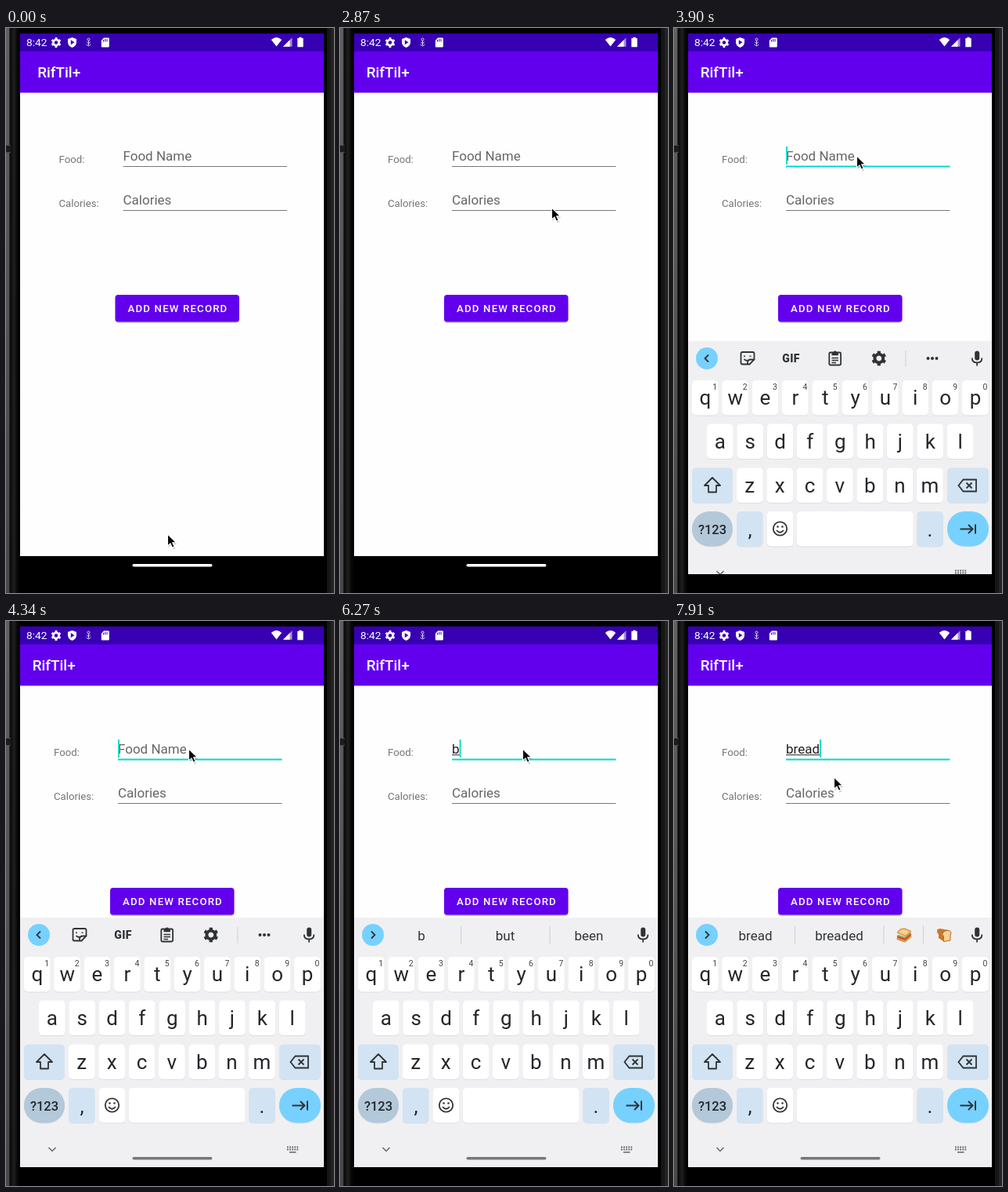
Recreate the animation shown at these times as an HTML page. Size 419 by 720 pixels, loop 8000 ms.

```html
<!DOCTYPE html>
<html lang="en">
<head>
<meta charset="utf-8">
<title>Food record form</title>
<style>
  html, body { margin: 0; width: 100%; height: 100%; overflow: hidden; background: #000; }
  svg { display: block; width: 100vw; height: 100vh; font-family: Roboto, sans-serif; }
  .mid { text-anchor: middle; }
  .label { font-size: 13.2px; fill: #757575; }
  .field { font-size: 17px; fill: #666; }
  .typed { fill: #212121; }
  .line { fill: none; stroke: #303336; stroke-width: 1.8; }
  .letter { font-size: 26px; fill: #24272a; }
  .digit { font-size: 10.5px; fill: #444; }
  .word { font-size: 17px; fill: #303336; }
  .rule { stroke: #cdced2; }
</style>
</head>
<body>
<svg viewBox="0 0 419 720" preserveAspectRatio="none">
  <defs>
    <linearGradient id="bezel">
      <stop offset="0" stop-color="#080808"/><stop offset=".4" stop-color="#202020"/>
      <stop offset=".7" stop-color="#090909"/><stop offset="1" stop-color="#000"/>
    </linearGradient>
    <linearGradient id="edge" x2="0" y2="1">
      <stop offset="0" stop-color="#606060"/><stop offset="1" stop-color="#484848"/>
    </linearGradient>
    <clipPath id="screen"><path d="M18 82H406V696H18z"/></clipPath>
  </defs>

  <path d="M0 0H419V720H0z"/>
  <path d="M5 0H18V720H5z" fill="url(#bezel)"/>
  <path d="M0 0H4.5V720H0z" fill="url(#edge)"/>
  <path d="M0 149H6V159H0z" fill="#1c1c1c"/>
  <path d="M0 149.5H6M0 158.5H6" stroke="#4a4a4a"/>
  <path d="M410 0H415V720H410z" fill="#161616"/>
  <path d="M415 0H419V720H415z" fill="#242424"/>
  <path d="M18 7H406V30H18z" fill="#3700b3"/>
  <path d="M18 82H406V673H18z" fill="#fefefe"/>
  <path d="M18 29.7H406V82.5H18z" fill="#6200ee"/>

  <g fill="#fff">
    <text x="26" y="23.3" font-size="13.7">8:42</text>
    <g id="statusGear"></g>
    <path d="M84.5 12l5.5 2v4.2q0 4.4-5.5 6.8q-5.5-2.4-5.5-6.8V14z"/>
    <path d="M82.8 15.3v6l4.6-3z" fill="#3700b3"/>
    <g fill="none" stroke="#fff" opacity=".85">
      <circle cx="105.5" cy="14.6" r="1.5"/>
      <path d="M105.5 16V22M103.2 17.8l2.3 2.2l2.3-2.2M102.8 20.8q2.7 4.2 5.4 0"/>
    </g>
    <path d="M125 12.5h5.8q1 0 1 1V23.5q0 1-1 1h-8q-1 0-1-1V16z"/>
    <path d="M124.5 15v2.5M126.7 14v3.5M129 14v3.5" stroke="#3700b3"/>
    <path d="M338.8 15q6.7-5.8 13.4 0L345.5 23.6z"/>
    <path d="M365.5 12.2V23.7H354z" opacity=".55"/><path d="M362.5 15.2V23.7H354z"/>
    <path d="M374.3 11.7h3.4v1.3h2V24.2h-7.4V13h2z"/>
  </g>

  <g id="page">
    <text x="33.7" y="63" font-size="18.9" font-weight="500" fill="#fff">RifTil+</text>
    <text class="label" x="61" y="172">Food:</text>
    <text class="label" x="61" y="228">Calories:</text>
    <text class="field" id="hint" x="143" y="169">Food Name</text>
    <text class="field typed" id="typed" x="143" y="169"></text>
    <path id="composing" stroke="#212121"/>
    <path id="foodLine" d="M143 176.5H352.5"/>
    <text class="field" x="143" y="225">Calories</text>
    <path d="M143 232.5H352.5" stroke="#777"/>
    <path id="caret" stroke="#03dac5" stroke-width="1.8"/>
    <rect x="133" y="341.5" width="158.5" height="34.5" rx="4" opacity=".18"/>
    <rect x="133" y="340" width="158.5" height="34.5" rx="3.8" fill="#6200ee"/>
    <text class="mid" x="213" y="362" font-size="13.2" font-weight="500" letter-spacing="1.18" fill="#fff">ADD NEW RECORD</text>
  </g>

  <g clip-path="url(#screen)">
    <g id="keyboard">
      <path d="M18 378H406V1100H18z" fill="#f0f0f2"/>
      <circle cx="42" cy="400" r="14" fill="#76d1ff"/>
      <path class="line" id="arrow"/>
      <g id="tools">
        <g class="line">
          <path d="M94 407.5h-6.5q-2 0-2-2V394q0-2 2-2h13q2 0 2 2v7.5l-6 6H94v-2q0-4 4-4h4.500"/>
          <path d="M90 396.5v1.5M97.5 396.5v1.5M89.5 401q2 2.5 5 1.5"/>
          <rect x="198.3" y="392.5" width="14.8" height="16" rx="1.5"/>
          <path d="M201.5 399.5h8.5M201.5 402.5h8.5M201.5 405.5h5.500" stroke-width="1.4"/>
        </g>
        <path d="M201.5 396.3V392h2.2a2.100 2.100 0 0 1 4 0h2.200v4.300z" fill="#303336"/>
        <text class="mid" x="149.5" y="405" font-size="14" font-weight="900" letter-spacing=".3" fill="#303336">GIF</text>
        <g id="toolGear"></g>
        <path class="rule" d="M296 390V410.5"/>
        <path d="M324.5 400h.01M330 400h.01M335.5 400h.01" stroke="#303336" stroke-width="4" stroke-linecap="round"/>
      </g>
      <g id="words"></g>
      <rect x="384.2" y="390.5" width="6" height="12" rx="3" fill="#303336"/>
      <path class="line" d="M380.8 399.5q0 6 6.3 6t6.3-6M387.1 405.5V409.5"/>
      <g id="keys"></g>
      <g class="line">
        <path d="M49 552l10 10h-5v8.5H44V562h-5z" stroke-linejoin="round"/>
        <path d="M369.5 554.5H386V569.5H369.5L363.5 562zM373.5 558.5l7 7M380.5 558.5l-7 7"/>
        <circle cx="135.5" cy="617" r="8.7"/>
        <path d="M131 619q4.5 5.5 9 0"/>
        <path d="M132.5 614.5h.01M138.5 614.5h.01" stroke-width="2.6" stroke-linecap="round"/>
        <path d="M365.5 617.5H381M376 612l5.5 5.5l-5.5 5.5M385 611.5V623.5" stroke-width="2"/>
      </g>
      <path d="M54.5 671l4.5 4.5l4.5-4.5" fill="none" stroke="#666" stroke-width="1.5"/>
      <path d="M359 670.5H373.5M359 673.5H373.5" stroke="#666" stroke-width="1.8" stroke-dasharray="1.8 1.3"/>
      <path d="M362 677H370.5" stroke="#666" stroke-width="1.5"/>
    </g>
  </g>
  <rect id="pill" x="161.5" y="683" width="102" height="3.6" rx="1.8"/>
  <g id="pointer">
    <path d="M1 2V17l3.5-3l2.5 5.5l3-1.3L7.5 13H12z" opacity=".18"/>
    <path d="M0 0V15l3.5-3.2l2.4 5.5l2.7-1.2l-2.4-5.3H11z" stroke="#fff" stroke-width="1.1"/>
  </g>
</svg>

<script>
const $ = id => document.getElementById(id);
const DURATION = 8000;

// Each row overrides the values of the rows before it.
const STEPS = [
  [0, { shift: 6.5, pointer: [206.5, 645], slide: 330, pill: '#fff', focus: false, caret: false, text: '', composed: 0, words: [] }],
  [180, { shift: 3 }],
  [320, { shift: 1 }],
  [470, { shift: 0 }],
  [2870, { pointer: [270.5, 229] }],
  [3020, { pointer: [264, 174] }],
  [3170, { pointer: [250, 130] }],
  [3310, { pointer: [239, 146] }],
  [3460, { pointer: [233.5, 163] }],
  [3610, { focus: true, caret: true }],
  [3750, { slide: 150, pill: 'none' }],
  [3900, { slide: 21 }],
  [4050, { slide: 0, pill: '#aaa' }],
  [4200, { pill: '#777' }],
  [4640, { caret: false }],
  [5090, { caret: true }],
  [5530, { caret: false }],
  [6130, { caret: true, text: 'b', composed: 1, words: ['b', 'but', 'been'] }],
  [6570, { text: 'br', composed: 2 }],
  [6870, { text: 'bre', composed: 3, words: ['br', 'bro', 'bring'] }],
  [7170, { text: 'brea', words: ['bre', 'break', 'bread'] }],
  [7320, { composed: 4 }],
  [7470, { text: 'bread', composed: 5 }],
  [7610, { words: ['bread', 'breaded'], pointer: [230, 169] }],
  [7760, { pointer: [212, 188] }],
  [7910, { pointer: [204.5, 199] }]
];

const gear = (x, y, r, color) => `<g fill="none" stroke="${color}" transform="translate(${x} ${y}) rotate(15)">
  <circle r="${r * .57}" stroke-width="${r * .42}"/>
  <circle r="${r * .84}" stroke-width="${r * .32}" pathLength="12" stroke-dasharray="1 1"/></g>`;

const key = (x, y, w, fill = '#fff', rx = 5) =>
  `<rect x="${x}" y="${y + 1}" width="${w}" height="44.5" rx="${rx}" fill="#dedee2"/>
   <rect x="${x}" y="${y}" width="${w}" height="44.5" rx="${rx}" fill="${fill}"/>`;

const label = (text, x, y, cls, extra = '') => `<text class="mid ${cls}" x="${x}" y="${y}" ${extra}>${text}</text>`;

const row = (letters, x, y, digits = '') => [...letters].map((letter, i) => {
  const cx = x + i * 38.35;
  return key(cx - 16.8, y, 33.6) + label(letter, cx, y + 31, 'letter') +
    (digits ? label(digits[i], cx + 12.5, y + 12, 'digit') : '');
}).join('');

function drawKeys() {
  const tint = '#d2e4f4';
  return row('qwertyuiop', 39.8, 428, '1234567890') +
    row('asdfghjkl', 58.8, 483.5) + row('zxcvbnm', 96.8, 539.5) +
    key(23, 539.5, 52, tint) + key(349, 539.5, 53, tint) +
    key(23, 595, 52, '#b3c8d9', 22) + label('?123', 49, 623.5, '', 'font-size="16.5" font-weight="500" fill="#24272a"') +
    key(80, 595, 33.6, tint) + label(',', 97, 627, 'letter') +
    key(118.7, 595, 33.6) + key(157, 595, 148.5) +
    key(310.3, 595, 33.6, tint) + label('.', 327, 627, 'letter') +
    key(349, 595, 53, '#76d1ff', 22);
}

const SNACKS = `
  <g stroke-linecap="round" stroke-linejoin="round" fill="none">
    <path d="M286 405l9 3l7-6" stroke="#dc9a4c" stroke-width="3"/>
    <path d="M286 402.5l9 3l7-6" stroke="#d9482f" stroke-width="2.5"/>
    <path d="M286 400.5l9 3l7-6" stroke="#79b648" stroke-width="1.5"/>
    <path d="M285.5 397q3-5 9-5l8 3.5l-7 6z" fill="#f6cf8a" stroke="#dc9a4c" stroke-width="1.5"/>
    <path d="M336 395q0-3 4-3l11 2v13l-7 1l-6-4v-5q-2-1-2-4z" fill="#c8782c"/>
    <path d="M343.500 397q4-4 9-2q3 2 .5 5v7l-8.500 1.500v-7q-3-2-1-4.500z" fill="#f8d394" stroke="#b96a22"/>
  </g>`;

function drawWords(words) {
  if (!words.length) return '';
  const emoji = words.length === 2;
  const rules = [154.5, 268].concat(emoji ? 318.5 : []);
  return rules.map(x => `<path class="rule" d="M${x} 388.5V411.5"/>`).join('') +
    words.map((word, i) => label(word, [104, 211, 318][i], 406.5, 'word')).join('') + (emoji ? SNACKS : '');
}

const move = (id, x, y) => $(id).setAttribute('transform', `translate(${x} ${y})`);
const path = (id, d) => $(id).setAttribute('d', d);
const show = (id, on) => $(id).setAttribute('visibility', on ? 'visible' : 'hidden');

function render(s) {
  move('page', s.shift, 0);
  move('pointer', ...s.pointer);
  move('keyboard', 0, s.slide);
  $('pill').setAttribute('fill', s.pill);

  $('typed').textContent = s.text;
  show('hint', !s.text);
  const width = n => n ? $('typed').getSubStringLength(0, n) : 0;
  path('composing', s.composed ? `M143 170.7h${width(s.composed)}` : '');
  path('caret', `M${144 + width(s.text.length)} 151V174`);
  show('caret', s.caret);
  $('foodLine').setAttribute('stroke', s.focus ? '#03dac5' : '#777');
  $('foodLine').setAttribute('stroke-width', s.focus ? 1.9 : 1);

  show('tools', !s.words.length);
  $('words').innerHTML = drawWords(s.words);
  path('arrow', s.words.length ? 'M40 395.5l4.5 4.5l-4.5 4.5' : 'M44 395.5l-4.5 4.5l4.5 4.5');
}

$('statusGear').innerHTML = gear(64, 18.5, 6.4, '#fff');
$('toolGear').innerHTML = gear(261.8, 400, 9.4, '#303336');
$('keys').innerHTML = drawKeys();

let current = -1;
function tick() {
  const time = performance.now() % DURATION;
  const count = STEPS.filter(([at]) => at <= time).length;
  if (count !== current) {
    current = count;
    render(Object.assign({}, ...STEPS.slice(0, count).map(([, change]) => change)));
  }
  requestAnimationFrame(tick);
}
tick();
</script>
</body>
</html>
```
